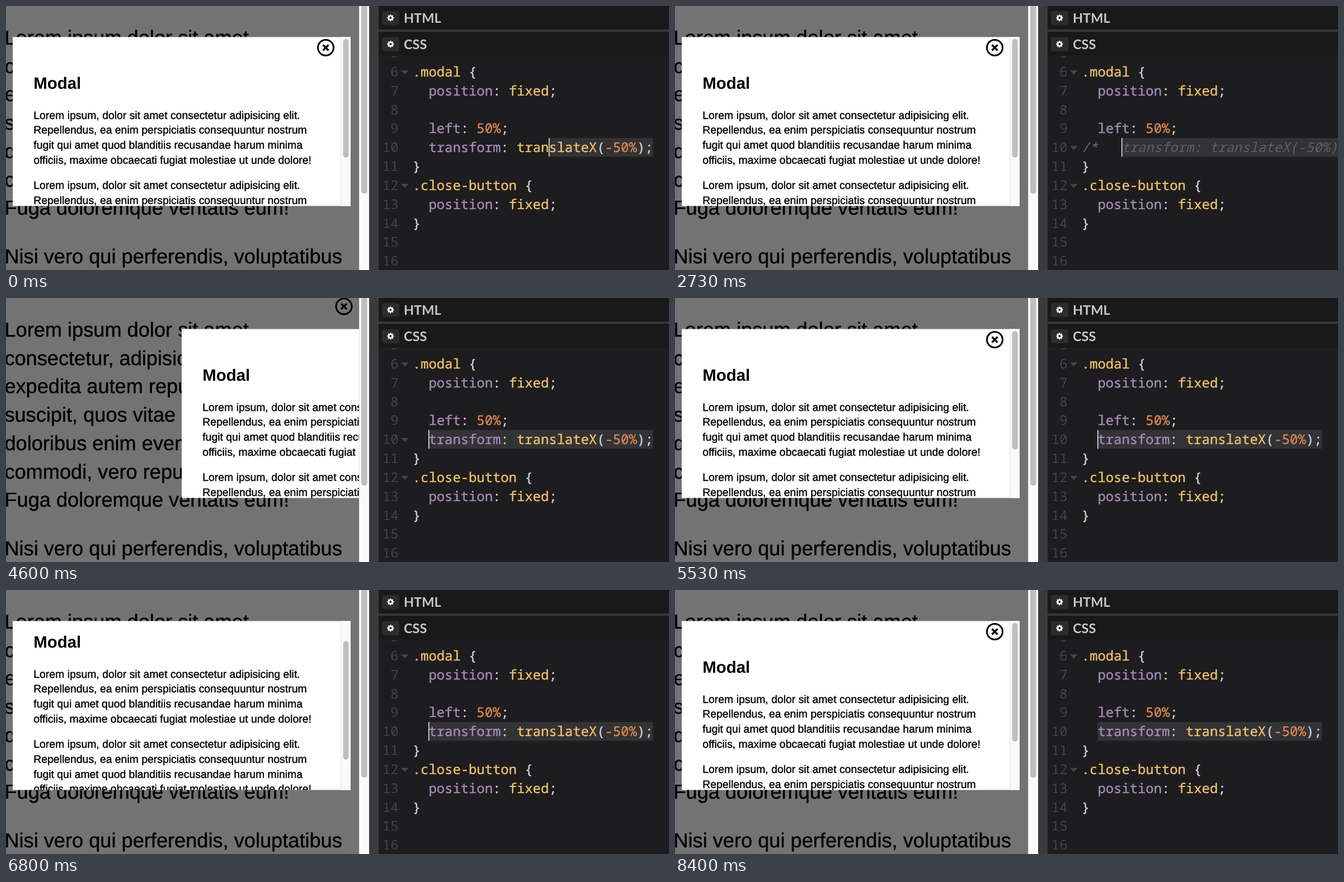
An HTML page with a canvas that plays this animation: 1185 by 472 pixels, repeating every 8470 ms.

```html
<!DOCTYPE html>
<html lang="en">
<head>
<meta charset="utf-8">
<title>Fixed modal with and without transform</title>
<style>
  html, body { margin: 0; width: 100%; height: 100%; overflow: hidden; background: #1d1d1f; }
  canvas { display: block; }
</style>
</head>
<body>
<canvas id="stage" width="1185" height="472"></canvas>
<script>
const ctx = document.getElementById('stage').getContext('2d');

const LOOP = 8470;
const COMMENT_AT = 1600, UNCOMMENT_AT = 4240;
const FOLD_DELAY = 600, REFRESH_DELAY = 1160;
const BLINK = 530;

const SANS = '"Liberation Sans", Arial, sans-serif';
const MONO = '23.87px "Noto Sans Mono", monospace';
const CHAR = 14.32, CODE_X = 726.8, ROW = 33.83;
const GOLD = '#f1c16c', PURPLE = '#a88bb9', ORANGE = '#d98752', PLAIN = '#d0d0d0', DIM = '#444446';

const PAGE = [
  'Lorem ipsum dolor sit amet',
  'consectetur, adipisicing elit.',
  'expedita autem repudiandae',
  'suscipit, quos vitae cumque',
  'doloribus enim eveniet quae',
  'commodi, vero repudiandae.',
  'Fuga doloremque veritatis eum!'
];
const PARAGRAPH = [
  'Lorem ipsum, dolor sit amet consectetur adipisicing elit.',
  'Repellendus, ea enim perspiciatis consequuntur nostrum',
  'fugit qui amet quod blanditiis recusandae harum minima',
  'officiis, maxime obcaecati fugiat molestiae ut unde dolore!'
];
const POSITION = [[PURPLE, '  position'], [PLAIN, ': '], [GOLD, 'fixed'], [PLAIN, ';']];
const TRANSFORM = [[PURPLE, '  transform'], [PLAIN, ': '], [GOLD, 'translateX'],
  [PLAIN, '('], [ORANGE, '-50%'], [PLAIN, ');']];
const CODE = {
  6: [[GOLD, '.modal'], [PLAIN, ' {']],
  7: POSITION,
  9: [[PURPLE, '  left'], [PLAIN, ': '], [ORANGE, '50%'], [PLAIN, ';']],
  11: [[PLAIN, '}']],
  12: [[GOLD, '.close-button'], [PLAIN, ' {']],
  13: POSITION,
  14: [[PLAIN, '}']]
};

const clamp = u => Math.max(0, Math.min(1, u));
const smooth = u => { u = clamp(u); return u * u * (3 - 2 * u); };
const within = (t, from, to) => t >= from && t < to;
const baseline = n => 126 + (n - 6) * ROW;

function rect(x, y, w, h, color) {
  ctx.fillStyle = color;
  ctx.fillRect(x, y, w, h);
}

function pill(x, y, w, h, r, color) {
  ctx.fillStyle = color;
  ctx.beginPath();
  ctx.roundRect(x, y, w, h, r);
  ctx.fill();
}

function text(str, x, y, font, color, align = 'left') {
  ctx.font = font;
  ctx.fillStyle = color;
  ctx.textAlign = align;
  ctx.fillText(str, x, y);
}

// A hairline outline gives the slightly heavier strokes of smoothed text.
function heavyText(str, x, y, font, color) {
  text(str, x, y, font, color);
  ctx.strokeStyle = color;
  ctx.lineWidth = 0.4;
  ctx.strokeText(str, x, y);
}

function clipped(x, y, w, h, draw) {
  ctx.save();
  ctx.beginPath();
  ctx.rect(x, y, w, h);
  ctx.clip();
  draw();
  ctx.restore();
}

function closeButton(x, y) {
  ctx.strokeStyle = '#000';
  ctx.lineWidth = 3;
  ctx.beginPath();
  ctx.arc(x, y, 14, 0, Math.PI * 2);
  ctx.stroke();
  ctx.lineWidth = 3.4;
  ctx.beginPath();
  for (const s of [-1, 1]) {
    ctx.moveTo(x - 5, y - 5 * s);
    ctx.lineTo(x + 5, y + 5 * s);
  }
  ctx.stroke();
}

function scrollAt(t) {
  if (t < 6550) return 70 * smooth((t - 6165) / 385);
  return 70 * Math.cos(clamp((t - 6550) / 450) * Math.PI / 2);
}

function modal(x, scroll, shifted) {
  clipped(x, 55.5, 604, 302, () => {
    rect(x, 55, 604, 303, '#fff');
    const left = x + 37.3;
    text('Modal', left, 147.9 - scroll, 'bold 29.4px ' + SANS, '#000');
    for (let p = 0; p < 3; p++) {
      PARAGRAPH.forEach((str, i) =>
        heavyText(str, left, 201.8 + p * 125.6 + i * 26.6 - scroll, '19.4px ' + SANS, '#000'));
    }
    if (!shifted) closeButton(571.5, 74.5 - scroll);
    rect(x + 586, 55, 18, 303, '#fafafa');
    rect(x + 586, 55, 1, 303, '#e6e6e6');
    pill(x + 590.5, 59 + scroll * 0.717, 10, 212, 5, '#bebebe');
  });
}

function preview(t) {
  const shifted = within(t, COMMENT_AT + REFRESH_DELAY, UNCOMMENT_AT + REFRESH_DELAY);
  clipped(0, 0, 631, 472, () => {
    rect(0, 0, 631, 472, '#737373');
    const font = '36.2px ' + SANS;
    PAGE.forEach((str, i) => heavyText(str, -2.6, 69 + i * 50.7, font, '#000'));
    heavyText('Nisi vero qui perferendis, voluptatibus', -2.6, 460, font, '#000');
    modal(shifted ? 314 : 12, Math.round(scrollAt(t)), shifted);
    if (shifted) closeButton(604, 15);
  });
  rect(631, 0, 18, 472, '#fafafa');
  rect(631, 0, 1, 472, '#e6e6e6');
  pill(635, -20, 10.5, 355.5, 5, '#bebebe');
  rect(649, 0, 17, 472, '#3b3b3d');
}

function gear(x, y) {
  ctx.strokeStyle = '#fff';
  ctx.lineWidth = 2.6;
  ctx.beginPath();
  ctx.arc(x, y, 3.4, 0, Math.PI * 2);
  ctx.stroke();
  ctx.lineWidth = 2.3;
  ctx.beginPath();
  for (let i = 0; i < 8; i++) {
    const c = Math.cos(i * Math.PI / 4), s = Math.sin(i * Math.PI / 4);
    ctx.moveTo(x + 3.5 * c, y + 3.5 * s);
    ctx.lineTo(x + 6 * c, y + 6 * s);
  }
  ctx.stroke();
}

function header(label, y, top, height) {
  rect(666, top, 519, height, '#19191a');
  pill(672, y - 12.5, 31, 25, 4, '#2c2c2e');
  gear(687.3, y - 0.3);
  text(label, 711, y + 8.6, 'bold 23.5px Lato, sans-serif', '#c8c8ca');
}

function foldArrow(n) {
  const y = baseline(n) - 11;
  ctx.fillStyle = DIM;
  ctx.beginPath();
  ctx.moveTo(706, y);
  ctx.lineTo(719.5, y);
  ctx.lineTo(712.75, y + 7.5);
  ctx.fill();
}

function codeLine(n, tokens) {
  let col = 0;
  for (const [color, str] of tokens) {
    heavyText(str, CODE_X + col * CHAR, baseline(n), MONO, color);
    col += str.length;
  }
}

function caretOn(t) {
  const base = t >= UNCOMMENT_AT ? UNCOMMENT_AT : t >= COMMENT_AT ? COMMENT_AT : 480;
  return t < base || (t - base) % (2 * BLINK) < BLINK;
}

function activeLine(t) {
  const commented = within(t, COMMENT_AT, UNCOMMENT_AT);
  const dragged = Math.round(15 * (1 - smooth((t - 40) / 400)));
  const start = CODE_X + (commented ? 5 : 2 + dragged) * CHAR;
  const end = commented ? 1185 : CODE_X + 30 * CHAR;
  rect(start, 236, end - start, 33.5, '#333335');
  if (commented) {
    const font = 'italic ' + MONO;
    text('/*', CODE_X, baseline(10), font, '#6c6c6e');
    text('transform: translateX(-50%); */', start, baseline(10), font, '#606062');
  } else {
    codeLine(10, TRANSFORM);
  }
  if (caretOn(t)) rect(Math.floor(start), 236, 1.4, 33.5, '#fff');
}

function editor(t) {
  rect(666, 0, 519, 472, '#1d1d1f');
  clipped(666, 89, 519, 383, () => {
    for (let n = 5; n <= 16; n++) text(n, 701.5, baseline(n), MONO, DIM, 'right');
    for (const n in CODE) codeLine(+n, CODE[n]);
    foldArrow(6);
    foldArrow(12);
    if (within(t, COMMENT_AT + FOLD_DELAY, UNCOMMENT_AT + FOLD_DELAY)) foldArrow(10);
    activeLine(t);
  });
  header('HTML', 21.5, 0, 42);
  rect(666, 42, 519, 4, '#38383a');
  header('CSS', 68.5, 46, 43);
  rect(666, 89, 519, 1, '#222224');
}

function frame(now) {
  const t = now % LOOP;
  editor(t);
  preview(t);
  requestAnimationFrame(frame);
}

ctx.textRendering = 'geometricPrecision';
ctx.lineJoin = 'round';
frame(0);
</script>
</body>
</html>
```
